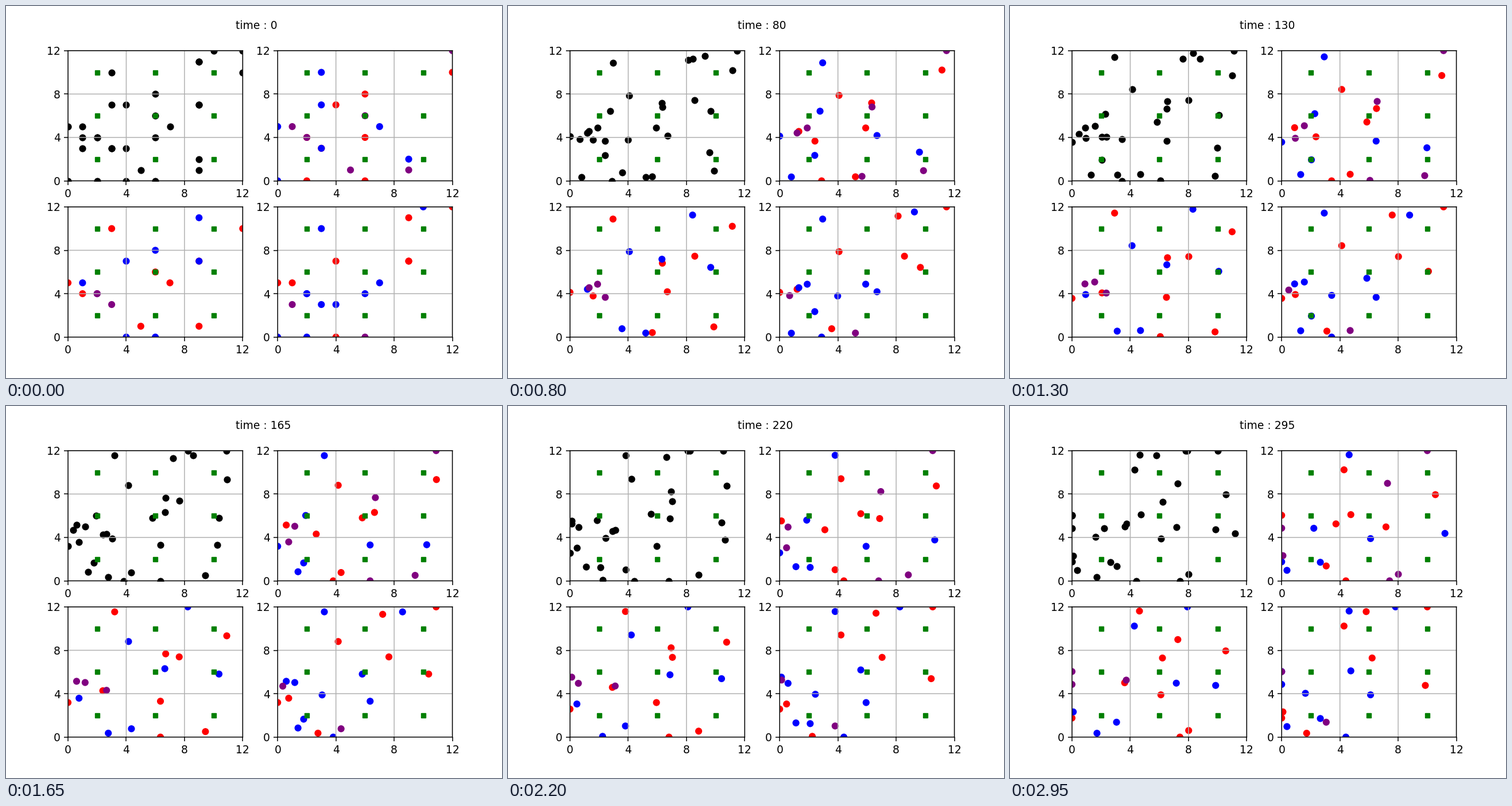
A matplotlib script for the animation above (3000 ms loop, 864 by 648 pixels).

```python
import itertools

import numpy as np
import matplotlib.pyplot as plt
from matplotlib.animation import FuncAnimation

FRAMES, INTERVAL, STEP = 60, 50, 5
SIZE = 12
SPEED = 0.011
COLORS = {"r": "red", "b": "blue", "p": "purple"}

# Group colours in panels 2-4 ("-" = absent), start cell, heading in degrees,
# then the times of right-angle turns: positive to the left, negative right.
WALKERS = [
    ("brr", 0, 5, -90), ("b-b", 0, 0, 24, 148, 215), ("--p", 1, 3, 111),
    ("-r-", 1, 4, -59, 45), ("pbr", 1, 5, -28, -42), ("rpb", 2, 4, 141),
    ("ppb", 2, 4, 97, 103), ("rp-", 3, 3, 131, -112),
    ("b-b", 3, 3, 228, 175, 230), ("r-b", 2, 0, 0, -220),
    ("brb", 3, 10, 93, -140), ("b--", 3, 7, -65, -40, 188),
    ("rbr", 4, 7, 85), ("--b", 4, 3, 84, 72), ("-br", 4, 0, 119, 84, -250),
    ("pr-", 5, 1, -42), ("rbp", 6, 0, 155), ("r-b", 6, 4, 96, 203),
    ("rb-", 6, 8, -69), ("pr-", 6, 6, 67), ("brb", 7, 5, -111, -190, -230),
    ("-b-", 9, 11, 192, -48), ("--r", 9, 11, 170), ("--b", 10, 12, 212, -133),
    ("-rr", 9, 7, 94, 45), ("-br", 9, 7, -41, -194), ("b--", 9, 2, 47),
    ("pr-", 9, 1, -4, -84, -126), ("rr-", 12, 10, 166, 83),
    ("p-r", 12, 12, 128),
]


def walk(x, y, heading, *turns):
    """Positions at every frame, walking at constant speed inside the field."""
    time = np.arange(FRAMES * STEP)
    angle = np.full(time.size, float(heading))
    for turn in turns:
        angle[time >= abs(turn)] += 90 * np.sign(turn)
    angle = np.radians(angle)
    moves = SPEED * np.column_stack([np.cos(angle), np.sin(angle)])
    path = (x, y) + np.cumsum(moves, axis=0) - moves[0]
    return np.clip(path[::STEP], 0, SIZE)


def members(panel):
    """Walker indices and colours of one panel, in drawing order."""
    if panel == 0:
        return list(range(len(WALKERS))), "black"
    tags = [w[0][panel - 1] for w in WALKERS]
    ids = [i for c in COLORS for i, tag in enumerate(tags) if tag == c]
    return ids, [COLORS[tags[i]] for i in ids]


plt.rcParams["path.snap"] = False
paths = np.array([walk(*route) for _, *route in WALKERS])
posts = np.array(list(itertools.product((2, 6, 10), repeat=2)))
ticks = range(0, SIZE + 1, 4)

fig, axes = plt.subplots(2, 2, figsize=(6.4, 4.8), dpi=135)
groups = []
for panel, ax in enumerate(axes.flat):
    ids, colors = members(panel)
    groups.append((ax.scatter(*paths[ids, 0].T, s=30, c=colors), ids))
    ax.scatter(*posts.T, s=16, c="green", marker="s")
    ax.set(xlim=(0, SIZE), ylim=(0, SIZE), xticks=ticks, yticks=ticks)
    ax.grid(True)
clock = axes[0, 0].text(11.5, 14, "time : 0")


def update(frame):
    for dots, ids in groups:
        dots.set_offsets(paths[ids, frame])
    clock.set_text(f"time : {frame * STEP}")
    return [clock, *(dots for dots, _ in groups)]


anim = FuncAnimation(fig, update, frames=FRAMES, interval=INTERVAL,
                     repeat=True, repeat_delay=0)
plt.show()
```
